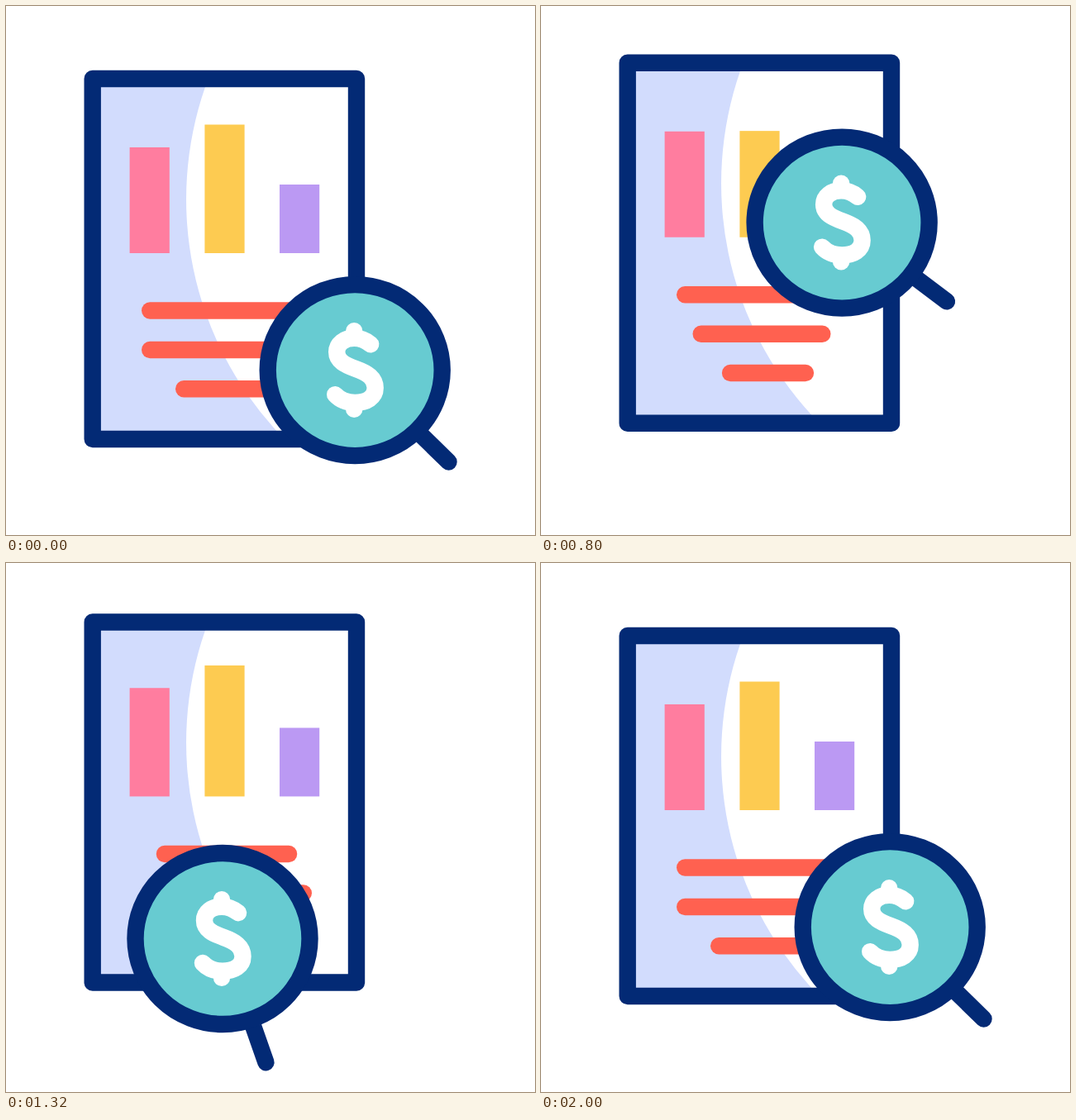
Write an HTML page that moves like this. It is 640 px wide and 640 px high and loops after 2.12 s.

```html
<!DOCTYPE html>
<html lang="en">
<head>
<meta charset="utf-8">
<title>Report review</title>
<style>
  html, body { margin: 0; width: 100%; height: 100%; overflow: hidden; background: #fff; }
  svg { display: block; width: 100%; height: 100%; }
  .stroke { fill: none; stroke-width: 20.4; stroke-linecap: round; stroke-linejoin: round; }
</style>
</head>
<body>
<svg viewBox="0 0 640 640">
  <g id="page">
    <path fill="#d2dcfd" d="M105 88V524H337L327.3 514A413.6 413.6 0 0 1 241 98L244 88Z"/>
    <g id="bars"></g>
    <g id="lines" class="stroke" stroke="#ff6150"></g>
    <rect class="stroke" stroke="#032a75" x="104.7" y="88" width="319.3" height="436"/>
  </g>
  <g id="lens">
    <path id="handle" class="stroke" stroke="#032a75" d="M108 0H158.6"/>
    <ellipse rx="105.5" ry="103.5" fill="#67cbd1" stroke="#032a75" stroke-width="20.4"/>
    <g fill="#fff">
      <circle cx="-1" cy="-47.3" r="10.2"/>
      <circle cx="-1" cy="47.3" r="10.2"/>
    </g>
    <path class="stroke" stroke="#fff" d="M19 -31.3C12 -37 6 -38.8 -1 -38.8C-13 -38.8 -22 -32 -22 -22C-22 -11 -12 -6.500 1 -1.600C15 3.400 24.500 9.500 24.500 21.500C24.500 33 14 39.300 0 39.300C-10 39.300 -18 36 -24 29.500"/>
  </g>
</svg>
<script>
const LOOP = 2120, STEP = 40;
const $ = id => document.getElementById(id);

function add(parent, tag, attrs) {
  const el = document.createElementNS("http://www.w3.org/2000/svg", tag);
  for (const name in attrs) el.setAttribute(name, attrs[name]);
  return parent.appendChild(el);
}

const ease = p => p < .5 ? 4 * p ** 3 : 1 - 4 * (1 - p) ** 3;

// Value at time t on a list of [time, value] keys
function track(t, keys) {
  if (t <= keys[0][0]) return keys[0][1];
  for (let i = 1; i < keys.length; i++) {
    const [t0, a] = keys[i - 1], [t1, b] = keys[i];
    if (t < t1) return a + (b - a) * ease((t - t0) / (t1 - t0));
  }
  return keys[keys.length - 1][1];
}

const bars = [
  { x: 149.6, h: 128, fill: "#ff7d9f", start: 920 },
  { x: 240.4, h: 155.5, fill: "#fdcb51", start: 665 },
  { x: 331, h: 83, fill: "#bb99f3", start: 350 }
];
for (const b of bars) b.el = add($("bars"), "rect", { x: b.x, width: 48.2, fill: b.fill });

const lines = [
  { x: 267, y: 368.5, half: 103, start: 810 },
  { x: 267, y: 416, half: 103, start: 564 },
  { x: 274.5, y: 463.2, half: 69.5, start: 318 }
];
for (const l of lines) l.el = add($("lines"), "path", {});

const barKeys = [[0, 1], [240, .74], [460, 1.05], [820, 1]];
const lineKeys = [[0, 1], [365, .77], [730, 1]];
const pageKeys = [[40, 0], [1052, -20.5], [1790, 0]];

const lensKeys = (rest, high, low) =>
  [[60, rest], [485, high], [586, high], [1294, low], [1315, low], [1923, rest]];
const lensX = lensKeys(422.2, 376.8, 262);
const lensY = lensKeys(440.6, 238.2, 454.5);
const lensAngle = lensKeys(44.4, 32.7, 70.7);

function draw(t) {
  $("page").setAttribute("transform", `translate(0 ${track(t, pageKeys)})`);
  for (const b of bars) {
    const h = b.h * track(t - b.start, barKeys);
    b.el.setAttribute("y", 299 - h);
    b.el.setAttribute("height", h);
  }
  for (const l of lines) {
    const half = l.half * track(t - l.start, lineKeys) - 10.2;
    l.el.setAttribute("d", `M${l.x - half} ${l.y}h${2 * half}`);
  }
  $("lens").setAttribute("transform", `translate(${track(t, lensX)} ${track(t, lensY)})`);
  $("handle").setAttribute("transform", `rotate(${track(t, lensAngle)})`);
}

const begin = performance.now();
function tick() {
  const t = (performance.now() - begin) % LOOP;
  draw(Math.floor(t / STEP) * STEP);
  requestAnimationFrame(tick);
}
tick();
</script>
</body>
</html>
```
